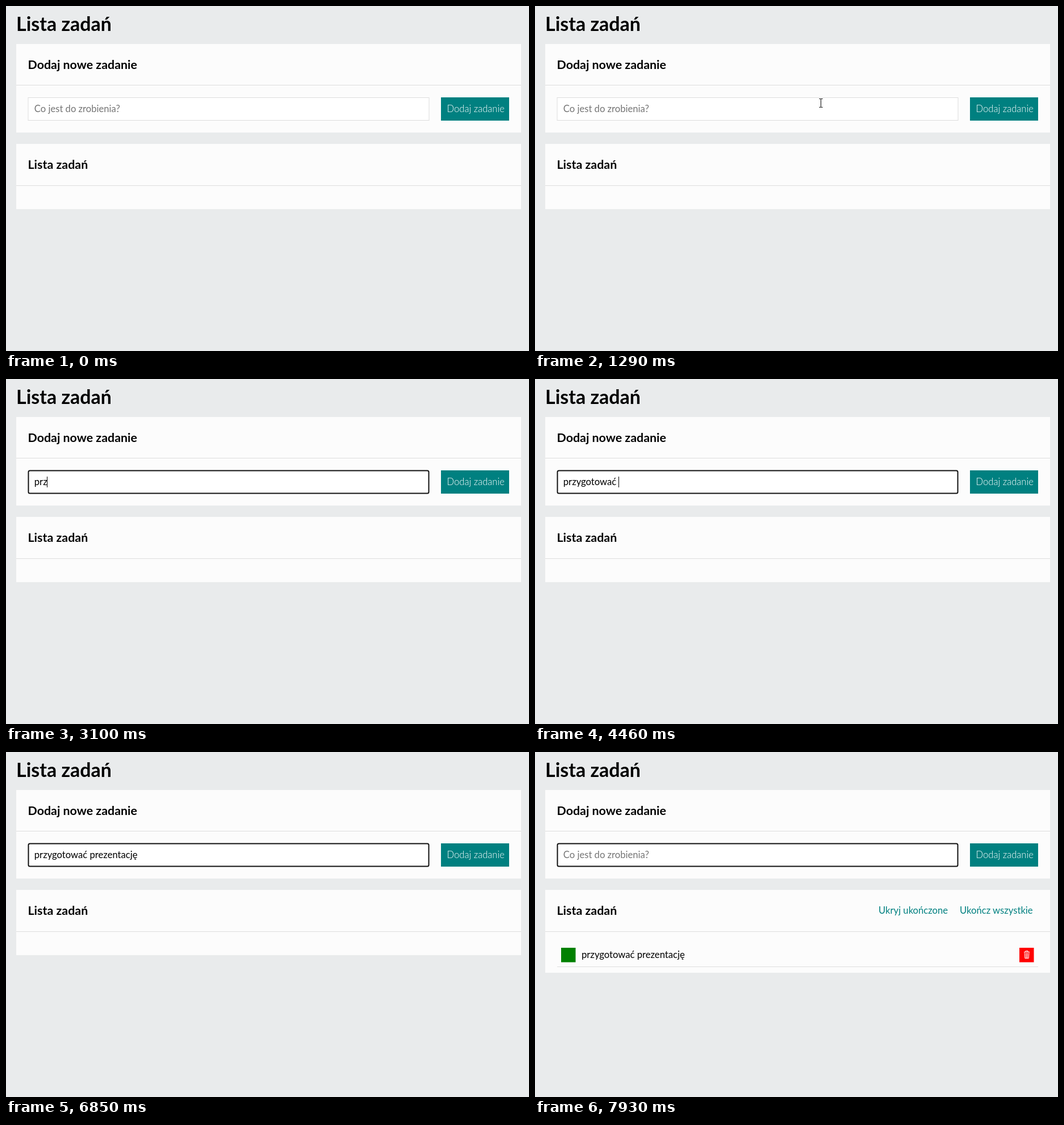
Animation, 921 px wide and 608 px high, one loop 8000 ms. Source, as an HTML page:

```html
<!DOCTYPE html>
<html lang="pl">
<head>
<meta charset="utf-8">
<title>Lista zadań</title>
<style>
  html, body { margin: 0; width: 100%; height: 100%; overflow: hidden; background: #e9ebec; }
  svg { display: block; width: 921px; height: 608px; font: 16.64px Lato, sans-serif; }
  text { white-space: pre; }
  h1, .h1, .h2 { font-weight: 700; }
  .h1 { font-size: 34px; }
  .h2 { font-size: 21.4px; }
  .panel { fill: #fcfcfc; }
  .rule { fill: #ddd; }
  .teal { fill: teal; }
</style>
</head>
<body>
<svg viewBox="0 0 921 608">
  <text class="h1" x="18" y="44">Lista zadań</text>

  <rect class="panel" x="18" y="67" width="889" height="156"/>
  <rect class="rule" x="18" y="139" width="889" height="1"/>
  <text class="h2" x="38.5" y="110.5">Dodaj nowe zadanie</text>
  <rect id="field" fill="#fff"/>
  <text id="entry" x="49.8" y="187"></text>
  <rect id="caret" y="172" width="1" height="19"/>
  <rect class="teal" x="766" y="161" width="120" height="41"/>
  <text x="776.5" y="187" fill="#fff" font-weight="300">Dodaj zadanie</text>

  <rect id="list" class="panel" x="18" y="243" width="889"/>
  <rect class="rule" x="18" y="316" width="889" height="1"/>
  <text class="h2" x="38.5" y="287">Lista zadań</text>
  <g id="task">
    <text class="teal" x="605" y="285">Ukryj ukończone</text>
    <text class="teal" x="748" y="285">Ukończ wszystkie</text>
    <rect x="46" y="345" width="25.5" height="25.5" fill="green"/>
    <text x="82" y="363">przygotować prezentację</text>
    <rect x="853" y="345" width="25.5" height="25.5" fill="red"/>
    <g fill="none" stroke="#fff" stroke-width="1">
      <path d="M861 352.5h10M864 352v-1.5h4v1.5M862 353.5l.8 10h6.4l.8-10"/>
      <path d="M864.3 354l.4 9M866 354v9M867.7 354l-.4 9" stroke-width=".8"/>
    </g>
    <rect class="rule" x="39" y="378" width="847" height="1"/>
  </g>

  <circle id="click" cx="402.3" cy="161" r="13.7" fill="#ff0" fill-opacity=".5"/>
  <path id="arrow" d="M0 0v16.5l3.8-3.6 2.5 5.8 2.3-1-2.5-5.7h5.4z" fill="#fff" stroke="#000"/>
  <path id="beam" d="M-3 -7.5h2.5l.5 .5 .5-.5H3M0 -7V7M-3 7.5h2.5l.5-.5 .5 .5H3" fill="none" stroke="#000"/>
</svg>
<script>
const LOOP = 8000, FOCUS = 1700, SUBMIT = 7400;
const PHRASE = "przygotować prezentację";
const KEYS = [2880, 2990, 3100, 3230, 3430, 3570, 3680, 3790, 3900, 4050, 4230, 4460,
  4660, 4720, 4790, 5050, 5250, 5360, 5470, 5580, 5850, 6050, 6320];
const BLINK = 530;

const el = Object.fromEntries([...document.querySelectorAll("[id]")].map(e => [e.id, e]));
const set = (node, attrs) => { for (const k in attrs) node.setAttribute(k, attrs[k]); };
const show = (node, on) => set(node, { visibility: on ? "visible" : "hidden" });
const bezier = (a, b, c, d, u) =>
  a * (1 - u) ** 3 + 3 * b * u * (1 - u) ** 2 + 3 * c * u * u * (1 - u) + d * u ** 3;

// The pointer is sampled in discrete steps, so progress is quantised.
const stepped = (t, from, to, steps) => Math.min(1, Math.floor((t - from) / (to - from) * steps + 0.05) / steps);

function pointerAt(t) {
  if (t < 390 || t >= 2240) return null;
  if (t < 1220) {
    const u = 1 - Math.cos(stepped(t, 390, 1150, 11) * Math.PI / 2);
    return [bezier(822, 790, 690, 590, u), bezier(559, 440, 197, 182.5, u)];
  }
  if (t < 2040) {
    const rest = 1 - stepped(t, 1150, 1560, 6);
    return [404 + 186 * rest ** 1.556, 162 + 20.5 * rest ** 2];
  }
  return t < 2140 ? [450, 164] : [540.5, 168];
}

function drawPointer(t) {
  const p = pointerAt(t);
  const inField = p && p[0] < 745 && p[1] > 161 && p[1] < 202;
  show(el.arrow, p && !inField);
  show(el.beam, inField);
  if (p) {
    const [x, y] = p.map(Math.round);
    set(el.arrow, { transform: `translate(${x + .5} ${y + .5})` });
    set(el.beam, { transform: `translate(${x + .5} ${y})` });
  }
  show(el.click, t >= FOCUS && t < 1790);
}

function drawField(t) {
  const focused = t >= FOCUS, done = t >= SUBMIT;
  set(el.field, focused
    ? { x: 39.5, y: 161.5, width: 705, height: 40, rx: 2.5, stroke: "#101010", "stroke-width": 2 }
    : { x: 39, y: 161.5, width: 706, height: 40, rx: 0, stroke: "#ddd", "stroke-width": 1 });

  const typed = done ? "" : PHRASE.slice(0, KEYS.filter(k => k <= t).length);
  el.entry.textContent = typed || "Co jest do zrobienia?";
  set(el.entry, { fill: typed ? "#000" : "#757575" });

  const lastInput = Math.max(FOCUS, ...[...KEYS, SUBMIT].filter(k => k <= t));
  show(el.caret, focused && Math.floor((t - lastInput) / BLINK) % 2 === 0);
  set(el.caret, { x: Math.floor(50 + (typed ? el.entry.getComputedTextLength() : 0)) });

  set(el.list, { height: done ? 146 : 115 });
  show(el.task, done);
}

function frame(now) {
  const t = now % LOOP;
  drawField(t);
  drawPointer(t);
  requestAnimationFrame(frame);
}
frame(0);
</script>
</body>
</html>
```
